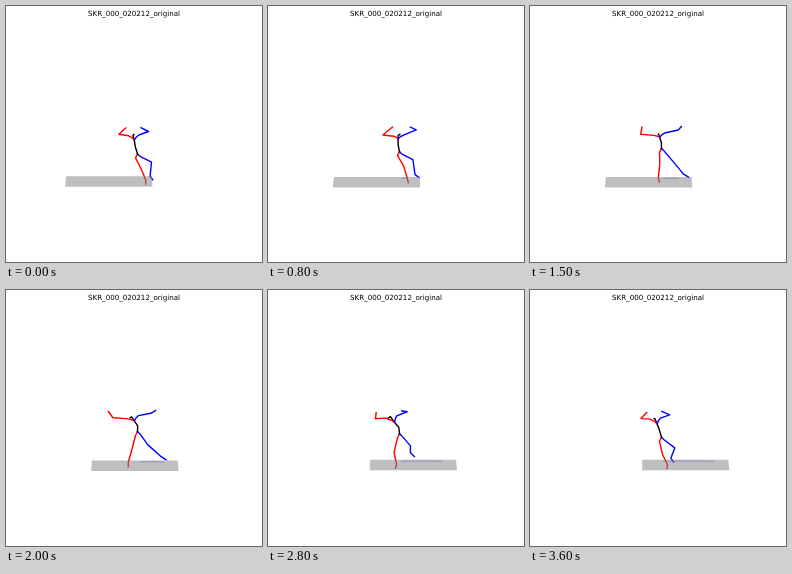
Animation of 256x256 px, one loop 3700 ms. Source, as an HTML page:

```html
<!DOCTYPE html>
<html lang="en">
<head>
<meta charset="utf-8">
<title>Walking skeleton</title>
<style>
  html, body { margin: 0; width: 100%; height: 100%; overflow: hidden; background: #fff; }
  svg { display: block; width: 100vw; height: 100vh; }
  text { font: 7.11px "DejaVu Sans", sans-serif; text-anchor: middle; }
  polyline { fill: none; stroke-width: 1.42; stroke-linejoin: round; stroke-linecap: square; }
  #trail { stroke: blue; stroke-width: .36; stroke-linecap: butt; }
  .right { stroke: red; }
  .left { stroke: blue; }
  #spine { stroke: black; }
  #floor { fill: gray; opacity: .5; }
</style>
</head>
<body>
<svg viewBox="0 0 256 256">
  <text x="128" y="10.4">SKR_000_020212_original</text>
  <polyline id="trail"/>
  <polyline id="rightLeg" class="right"/>
  <polyline id="leftLeg" class="left"/>
  <polyline id="spine"/>
  <polyline id="rightArm" class="right"/>
  <polyline id="leftArm" class="left"/>
  <!-- The translucent floor covers the feet. -->
  <polygon id="floor"/>
</svg>
<script>
const LOOP = 3700, STEP = 100;
const STRIDE = 4000; // one full walking cycle, slightly longer than the loop

function plot(id, points) {
  const text = points.map(p => p.map(v => v.toFixed(2)).join(",")).join(" ");
  document.getElementById(id).setAttribute("points", text);
}

const shift = ([x, y], dx, dy) => [x + dx, y + dy];
const between = ([ax, ay], [bx, by], u, v) => [ax + (bx - ax) * u, ay + (by - ay) * v];

// Steady travel, with a pause and a push in each stride.
function drawGround(p, c, s) {
  const x = 58.1 + 56 * p + 0.9 * c - 4.95 * s;
  const far = 170.4 - 0.2 * c + 0.65 * s;
  const near = far + 10.5, right = x + 87.3;
  const recede = v => 129 + (v - 129) * 0.983;
  plot("floor", [[x, near], [recede(x), far], [recede(right), far], [right, near]]);

  const length = (x - 59) * 0.95, y = far + 1.3;
  plot("trail", [[133.3, y], [133.3 + length / 2, y - 0.2], [133.3 + length, y]]);
}

// Joints swing with the stride (c, s); limbs add its double rate (c2, s2).
function drawBody(c, s, c2, s2) {
  const root = [131.5, 144.7 + 3.2 * c];
  const belly = [130.5 - 1.2 * c, 138.3 + 2.5 * c];
  const chest = [128.3 + 1.9 * s, 132.5 + 1.6 * c - 0.3 * s];
  const neck = [126.3 + 0.7 * c + 3.8 * s, 128.1 + 1.2 * c + 1.2 * s];
  const head = [126 + 1.9 * c + 5.5 * s, 128.2 + 0.4 * c];
  plot("spine", [root, belly, chest, neck, head]);

  const leg = (id, hip, knee, ankle, toe) => plot(id, [root, hip, knee, ankle, toe]);
  const rightAnkle = [132.6 + 8.7 * c + 2.7 * s - 1.6 * c2, 173 + 0.8 * c - 1.8 * s];
  leg("rightLeg", shift(root, -2, 4),
    [130.7 + 4.6 * c + 3.4 * s, 161 + 2.2 * c - 2.4 * s],
    rightAnkle,
    shift(rightAnkle, 1.2 * s, 4.3 + 0.8 * s));
  const leftAnkle = [
    146.8 - 5.3 * c + 4.2 * s + 2.6 * c2,
    167 + 2 * c + 2.6 * s + 1.3 * c2 - 0.7 * s2
  ];
  leg("leftLeg", shift(root, 2.5, 2.4),
    [143.7 + 1.8 * c + 0.7 * s, 155.5 + 0.6 * c - 1.3 * s - 1.2 * s2],
    leftAnkle,
    shift(leftAnkle, 4 - 1.3 * c + 0.4 * s, 3.5 - 0.6 * s));

  const arm = (id, shoulder, elbow, wrist) =>
    plot(id, [chest, between(chest, shoulder, 0.4, 0.55), shoulder, elbow, wrist]);
  arm("rightArm",
    [121.7 + 0.9 * c + 4 * s, 129.2 + 0.6 * c + 0.9 * s],
    [110.6 + 2.9 * c + 3 * s - 0.7 * c2, 128.5 + 0.3 * c - 0.5 * c2],
    [114 + 8.7 * c + 5.8 * s - 2.9 * c2, 121.8 + 0.2 * c - 0.9 * s]);
  arm("leftArm",
    [132.7 + 0.2 * c + 4.1 * s, 127.3 + 1.7 * c + 0.9 * s],
    [143.7 - 1.2 * c + 5.2 * s, 123.7 + 1.1 * c + 0.8 * s + 0.7 * c2 - 0.5 * s2],
    [140.3 - 7.3 * c + 7 * s + 2 * c2 - s2, 121 + 0.6 * c]);
}

function frame() {
  const p = Math.floor(performance.now() % LOOP / STEP) * STEP / STRIDE;
  const a = p * 2 * Math.PI;
  const c = Math.cos(a), s = Math.sin(a);
  drawGround(p, c, s);
  drawBody(c, s, Math.cos(2 * a), Math.sin(2 * a));
  requestAnimationFrame(frame);
}
frame();
</script>
</body>
</html>
```
